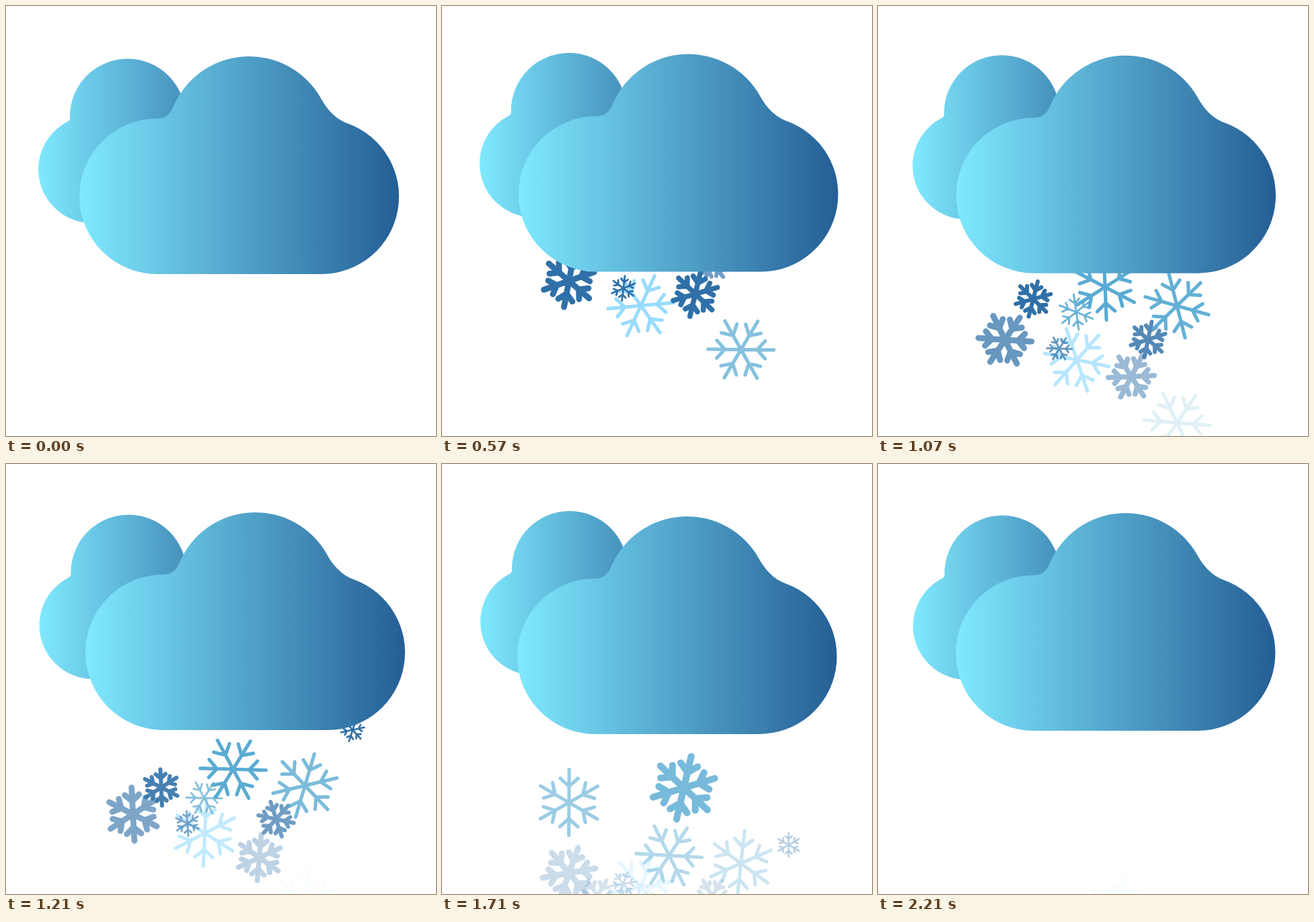
Animation, 640 px wide and 640 px high, one loop 2.43 s. Source, as an HTML page:

```html
<!DOCTYPE html>
<html lang="en">
<head>
<meta charset="utf-8">
<title>Snow cloud</title>
<style>
  html, body { margin: 0; width: 100%; height: 100%; overflow: hidden; background: #fff; }
  svg { display: block; width: 100%; height: 100%; }
</style>
</head>
<body>
<svg viewBox="0 0 640 640">
  <defs>
    <linearGradient id="frontFill" gradientUnits="userSpaceOnUse" x1="109" x2="585" y1="0" y2="0">
      <stop offset="0" stop-color="#80e9ff"/><stop offset="1" stop-color="#245e95"/>
    </linearGradient>
    <linearGradient id="backFill" gradientUnits="userSpaceOnUse" x1="48" x2="390" y1="0" y2="0">
      <stop offset="0" stop-color="#80e9ff"/><stop offset="1" stop-color="#245e95"/>
    </linearGradient>
  </defs>
  <g id="snow" fill="none" stroke-linecap="round"></g>
  <path id="back" fill="url(#backFill)"
    d="M128 323A79.8 79.8 0 0 1 90 173C94 171 96 169 95 164A86 86 0 0 1 267 165V323Z"/>
  <path id="front" fill="url(#frontFill)"
    d="M225 399A115.75 115.75 0 0 1 225 167.5C237 167.5 244 162 249 150A122.5 122.5 0 0 1 469 138C479 156 492 169 509 175A115.5 115.5 0 0 1 470 399Z"/>
</svg>
<script>
const LOOP = 2430, FPS = 14, LAST_STEP = 31, TURN = 400;
const snow = document.getElementById('snow');
const clamp = v => Math.max(0, Math.min(1, v));

// Stroke width is relative to the flake's radius
const KINDS = {
  thin: { color: '#5aabd3', width: .1 },
  pale: { color: '#97dcff', width: .1 },
  bold: { color: '#5aabd3', width: .19 },
  dark: { color: '#2f70a8', width: .2 },
  fine: { color: '#2f70a8', width: .14 }
};

function flakePath(arm) {
  let d = '';
  for (let a = 0; a < 6; a++) {
    const c = Math.cos(a * Math.PI / 3) * arm, s = Math.sin(a * Math.PI / 3) * arm;
    const at = (x, y) => `${x * c - y * s} ${x * s + y * c}`;
    d += `M0 0L${at(1, 0)}M${at(.735, -.27)}L${at(.49, 0)}L${at(.735, .27)}`;
  }
  return d;
}

// Over its life a flake falls by `drop`, turns once and fades in and out
function flake(kind, radius, x, y, start, life, drop = 380) {
  const { color, width } = KINDS[kind];
  const node = document.createElementNS('http://www.w3.org/2000/svg', 'path');
  node.setAttribute('d', flakePath(radius * (1 - width / 2)));
  node.setAttribute('stroke', color);
  node.setAttribute('stroke-width', radius * width);
  snow.append(node);
  return t => {
    const u = (t - start) / life;
    const alpha = Math.min(clamp(t / 250), clamp(u / .28), clamp((1 - u) / .62));
    node.setAttribute('opacity', alpha);
    node.setAttribute('transform', `translate(${x} ${y + drop * u}) rotate(${45 + 360 * u})`);
  };
}

const flakes = [
  flake('thin', 51.5, 445, 339, -221, 1455, 317),
  flake('pale', 51.5, 296, 309, -277, 2350),
  flake('dark', 44, 189, 287, -128, 2170),
  flake('dark', 30, 402, 310, 258, 1655),
  flake('dark', 38, 377, 320, 128, 1343, 330),
  flake('fine', 20, 270, 302, -89, 2118),
  flake('thin', 51.5, 445, 287, 383, 1640),
  flake('thin', 51.5, 338, 310, 648, 1480),
  flake('dark', 30, 231, 310, 680, 1175),
  flake('thin', 28, 295, 290, 511, 1283),
  flake('thin', 51.5, 189, 266, 1059, 1040),
  flake('bold', 53, 360, 294, 1203, 1025),
  flake('fine', 19, 516, 266, 831, 1110)
];

// Cloud offsets at each turning point, TURN ms apart
const clouds = {
  front: [[0, 0], [7, -8], [1, 4], [9, -3], [2, 4], [6.5, -2]],
  back: [[0, 0], [7, -6], [9, -13], [1.5, -3], [10, -10], [4, -2]]
};

function drift(points, t) {
  const i = Math.min(Math.floor(t / TURN), points.length - 2);
  const k = (1 - Math.cos(Math.PI * clamp(t / TURN - i))) / 2;
  return points[i].map((v, axis) => v + (points[i + 1][axis] - v) * k);
}

function render(t) {
  for (const id in clouds) {
    document.getElementById(id).setAttribute('transform', `translate(${drift(clouds[id], t)})`);
  }
  flakes.forEach(update => update(t));
}

const origin = performance.now();
function tick() {
  const t = (performance.now() - origin) % LOOP;
  const step = Math.min(LAST_STEP, Math.floor((t + 5) * FPS / 1000));
  render(Math.round(step * 100 / FPS) * 10);
  requestAnimationFrame(tick);
}
tick();
</script>
</body>
</html>
```
